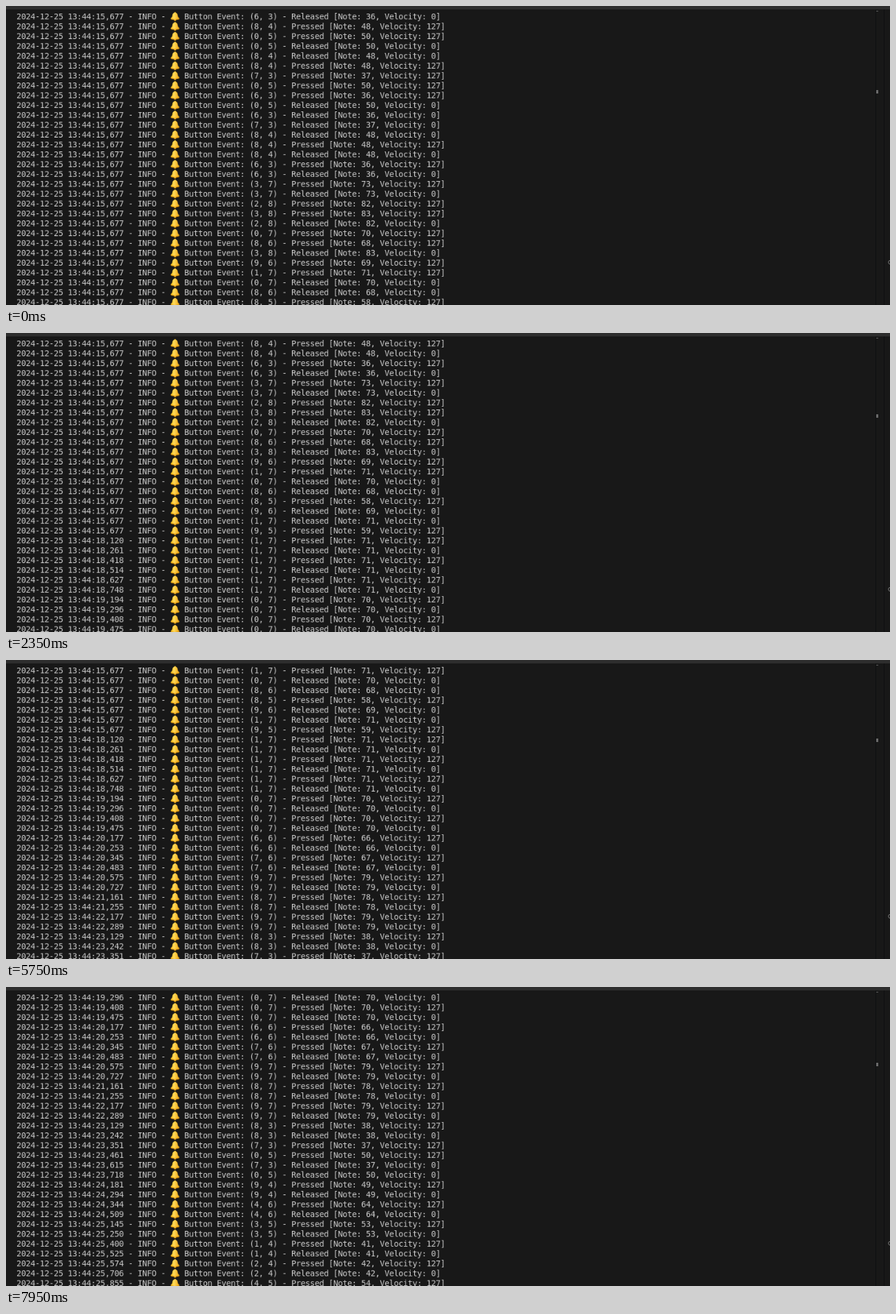
An HTML page with a canvas that plays this animation: 1280x434 px, repeating every 8000 ms.

```html
<!DOCTYPE html>
<html lang="en">
<head>
<meta charset="utf-8">
<title>Button event log</title>
<style>
  html, body { margin: 0; width: 100%; height: 100%; overflow: hidden; background: #181818; }
  canvas { display: block; }
</style>
</head>
<body>
<canvas id="stage" width="1280" height="434"></canvas>
<script>
const LOOP = 8000;
const ROWS = 30;
const CELL_W = 8, CELL_H = 17;        // terminal cell before scaling
const LEFT = 18, BASELINE = 23;
const BELL_COL = 33;

// Buttons touched in each second; a button alternates between press and release.
const SCORE = {
  15: "63 84 05 05 84 84 73 05 63 05 63 73 84 84 84 63 63 " +
      "37 37 28 38 28 07 86 38 96 17 07 86 85 96 17 95",
  18: "17 17 17 17 17 17",
  19: "07 07 07 07",
  20: "66 66 76 76 97 97",
  21: "87 87",
  22: "97 97",
  23: "83 83 73 05 73 05",
  24: "94 94 46 46",
  25: "35 35 14 14 24 24 45"
};

// Scroll bursts: first line, last line, number of lines, evenly spaced.
const BURSTS = [
  [50, 550, 6], [1200, 1700, 2], [1700, 2050, 3], [2050, 2350, 2],
  [2450, 2750, 3], [2950, 3050, 2], [4250, 4300, 2], [5300, 5400, 3],
  [5650, 5750, 3], [5950, 6250, 4], [6950, 7250, 5], [7450, 7950, 5]
];

function seeded(seed) {
  return () => (seed = seed * 16807 % 2147483647) / 2147483647;
}

function buildLog() {
  const random = seeded(41);
  const held = new Set(["63"]);
  const lines = [];
  for (const [second, buttons] of Object.entries(SCORE)) {
    buttons.split(" ").forEach((button, i) => {
      // The first second was flushed at once, later events arrive one by one.
      const ms = second === "15" ? 677 : Math.floor(120 + 110 * i + 80 * random());
      const pressed = !held.delete(button);
      if (pressed) held.add(button);
      const [x, y] = button;
      lines.push(`2024-12-25 13:44:${second},${ms} - INFO -    Button Event: (${x}, ${y}) - ` +
        `${pressed ? "Pressed" : "Released"} [Note: ${y}${x}, Velocity: ${pressed ? 127 : 0}]`);
    });
  }
  return lines;
}

function scrolledLines(time) {
  return BURSTS.reduce((sum, [from, to, count]) => {
    const passed = Math.floor((time - from) * (count - 1) / (to - from)) + 1;
    return sum + Math.max(0, Math.min(count, passed));
  }, 0);
}

const log = buildLog();
const ctx = document.getElementById("stage").getContext("2d");
const buffer = document.createElement("canvas");
buffer.width = 1518;
buffer.height = 516;
const term = buffer.getContext("2d");

function ellipse(color, x, y, rx, ry) {
  term.fillStyle = color;
  term.beginPath();
  term.ellipse(x, y, rx, ry, 0, 0, Math.PI * 2);
  term.fill();
}

function drawBell(x, y) {
  term.save();
  term.translate(x, y);
  ellipse("#ffca28", 8.3, -11, 1.6, 1.6);
  ellipse("#d18b0a", 8.3, -0.3, 7.4, 1.6);
  ellipse("#f2b01e", 8.3, 1, 2.1, 1.8);

  const body = term.createLinearGradient(2, 0, 15, 0);
  body.addColorStop(0, "#ffc41f");
  body.addColorStop(0.35, "#ffd95a");
  body.addColorStop(1, "#f0a814");
  term.fillStyle = body;
  term.beginPath();
  term.moveTo(8.3, -11.4);
  term.bezierCurveTo(12.4, -11.2, 12.6, -8, 13, -5.4);
  term.bezierCurveTo(13.3, -3.2, 15.8, -2.4, 15.9, -0.9);
  term.bezierCurveTo(14, 0.2, 2.6, 0.2, 0.7, -0.9);
  term.bezierCurveTo(0.8, -2.4, 3.3, -3.2, 3.6, -5.4);
  term.bezierCurveTo(4, -8, 4.2, -11.2, 8.3, -11.4);
  term.fill();
  term.restore();
}

function drawLine(text, row) {
  const y = BASELINE + row * CELL_H;
  term.fillStyle = "#cccccc";
  [...text].forEach((char, col) => {
    if (char !== " ") term.fillText(char, LEFT + col * CELL_W, y);
  });
  drawBell(LEFT + BELL_COL * CELL_W, y);
}

function box(color, x, y, w, h) {
  ctx.fillStyle = color;
  ctx.fillRect(x, y, w, h);
}

function drawFrame(top) {
  term.clearRect(0, 0, buffer.width, buffer.height);
  term.font = '14px "DejaVu Sans Mono", monospace';
  log.slice(top, top + ROWS).forEach(drawLine);

  box("#181818", 0, 0, 1280, 434);
  ctx.imageSmoothingQuality = "high";
  ctx.drawImage(buffer, 0, 0, 1280, 434);

  box("#2d2d2d", 0, 0, 1280, 5);
  box("#0e0f11", 1259, 5, 1, 429);
  box("#0e0f11", 1271, 5, 1, 429);

  // Overview ruler: the marker drifts up as the log grows.
  box("#5a5a5a", 1260, 7, 3, 1);
  box("#6a6a6a", 1260, Math.round(122 - 0.3 * top), 3, 5);

  ctx.strokeStyle = "#777777";
  ctx.lineWidth = 1;
  ctx.beginPath();
  ctx.arc(1280.5, 372, 2.8, 0, Math.PI * 2);
  ctx.stroke();
}

let shown = -1;
const start = performance.now();

function tick() {
  const top = scrolledLines((performance.now() - start) % LOOP);
  if (top !== shown) drawFrame(shown = top);
  requestAnimationFrame(tick);
}
tick();
</script>
</body>
</html>
```
